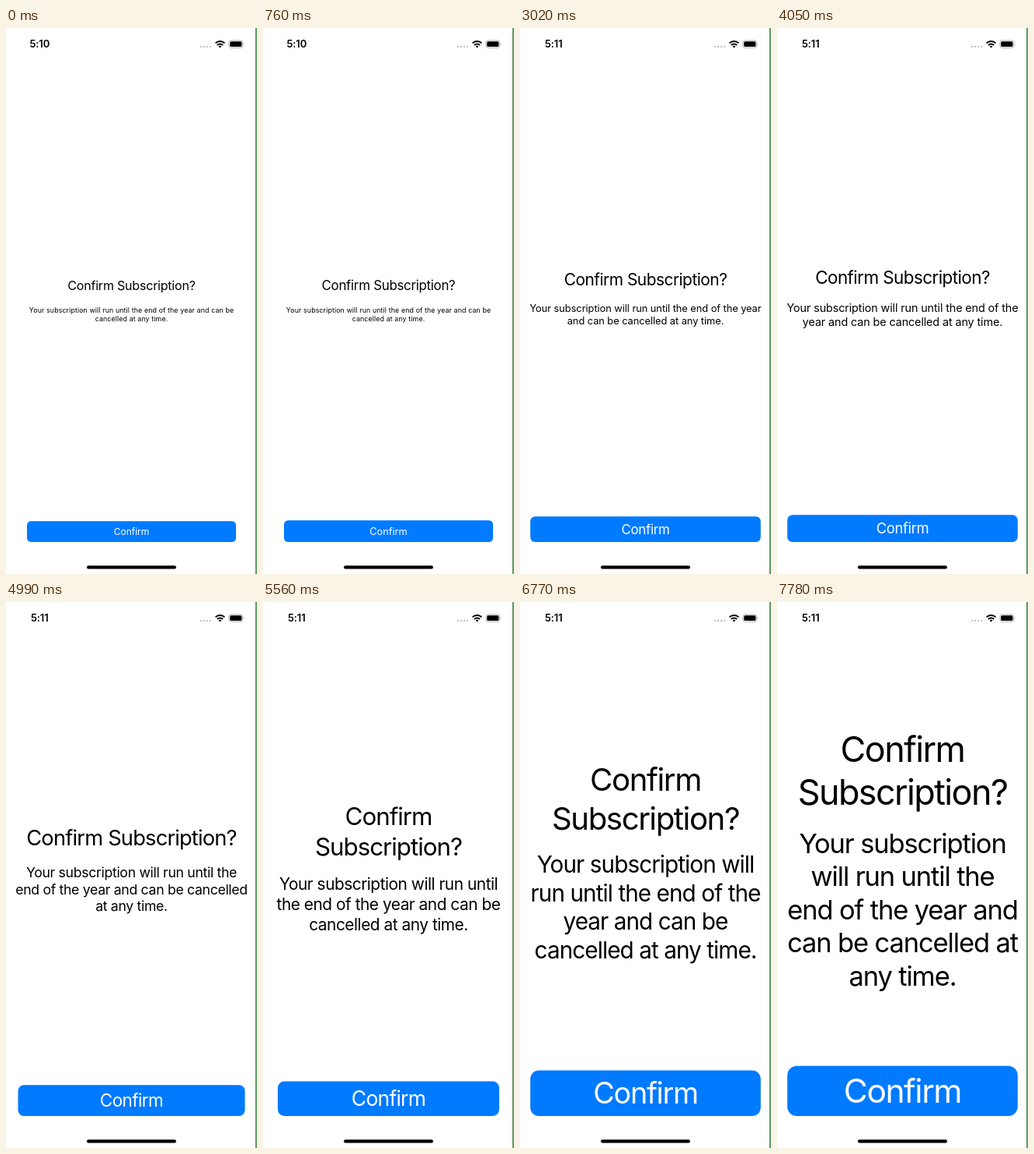
Write an HTML page that moves like this. It is 323 px wide and 700 px high and loops after 8.79 s.

```html
<!DOCTYPE html>
<html lang="en">
<head>
<meta charset="utf-8">
<style>
  html, body { margin: 0; width: 100%; height: 100%; overflow: hidden; background: #fff; }
  svg { display: block; width: 323px; height: 700px; }
  text { font-family: Inter, Roboto, sans-serif; font-optical-sizing: none; text-anchor: middle; }
</style>
</head>
<body>
<svg viewBox="0 0 323 700">
  <text id="clock" x="43.3" y="25.4" font-size="13" font-weight="600" letter-spacing="-.1"></text>
  <g fill="#c4c4c6">
    <circle cx="251" cy="24" r="1.2"/><circle cx="255" cy="24" r="1.2"/>
    <circle cx="259" cy="24" r="1.2"/><circle cx="263" cy="24" r="1.2"/>
  </g>
  <g fill="none" stroke="#000" stroke-width="2">
    <path d="M269.6 19.4a8.2 8.2 0 0 1 11.8 0M271.9 22a5 5 0 0 1 7.2 0"/>
    <path d="M275.5 25.6l-1.9-2a2.7 2.7 0 0 1 3.8 0z" fill="#000" stroke="none"/>
  </g>
  <rect x="286.9" y="16" width="17.8" height="9.4" rx="2.8" fill="none" stroke="#a8a8a8" stroke-width=".9"/>
  <rect x="288.2" y="17.3" width="15.2" height="6.8" rx="1.6"/>
  <path d="M305.7 19.2q1.5 1.5 0 3z" fill="#a8a8a8"/>
  <g id="content"></g>
  <rect x="104" y="689.3" width="115" height="4.2" rx="2.1"/>
  <rect x="321.2" width="1.3" height="700" fill="#0a640f"/>
</svg>
<script>
const LOOP = 8790, CLOCK_TICK = 1420;
const SCALE = 0.828, CENTER = 161.5, GAP = 16.3, BUTTON_BOTTOM = 659, TOP = 67;
const words = 'Your subscription will run until the end of the year and can be cancelled at any time.'.split(' ');

// start time, title / note / button point sizes, button width, words before each line break
const steps = [
  [0, 20, 11, 15, 269, [13]],
  [760, 21, 11, 16, 269, [13]],
  [1750, 22, 12, 17, 289.5, [13]],
  [2380, 24, 14, 19, 290, [11]],
  [3020, 26, 16, 21, 296.5, [10]],
  [4050, 28, 18, 23, 296.5, [9]],
  [4990, 34, 22, 28, 292, [6, 14]],
  [5560, 39, 26, 33, 285, [5, 13]],
  [6290, 44, 32, 40, 288, [4, 10, 15]],
  [6770, 50, 37, 47, 296.5, [3, 9, 13]],
  [7780, 56, 43, 53, 296.5, [2, 6, 11, 15]]
];

const lineHeight = pt => pt * SCALE * 1.193;

// Tracking tightens as the type grows
function line(str, pt, middle, fill = '#000') {
  const px = pt * SCALE, tracking = 0.13 * Math.exp(-pt / 11) - 0.035;
  return `<text x="${CENTER}" y="${middle + px * 0.352}" font-size="${px * 0.97}" ` +
    `letter-spacing="${tracking * px}" fill="${fill}">${str}</text>`;
}

function block(lines, pt, top) {
  return lines.map((str, i) => line(str, pt, top + (i + 0.5) * lineHeight(pt))).join('');
}

function screen([, titlePt, notePt, buttonPt, width, breaks]) {
  const title = titlePt > 34 ? ['Confirm', 'Subscription?'] : ['Confirm Subscription?'];
  const note = [...breaks, words.length].map((end, i) => words.slice(breaks[i - 1] || 0, end).join(' '));
  const height = lineHeight(buttonPt) + 12, buttonTop = BUTTON_BOTTOM - height;
  const titleHeight = title.length * lineHeight(titlePt);
  const total = titleHeight + GAP + note.length * lineHeight(notePt);
  const top = (TOP + buttonTop - total) / 2;
  return block(title, titlePt, top) +
    block(note, notePt, top + titleHeight + GAP) +
    `<rect x="${CENTER - width / 2}" y="${buttonTop}" width="${width}" height="${height}" rx="${height * 0.19}" fill="#007aff"/>` +
    line('Confirm', buttonPt, buttonTop + height / 2, '#fff');
}

const clock = document.getElementById('clock'), content = document.getElementById('content');
const screens = steps.map(screen);
let shown = -1;

function draw(now) {
  const t = now % LOOP;
  const index = steps.filter(([start]) => start <= t).length - 1;
  clock.textContent = t < CLOCK_TICK ? '5:10' : '5:11';
  if (index !== shown) content.innerHTML = screens[shown = index];
  requestAnimationFrame(() => draw(performance.now()));
}
draw(performance.now());
</script>
</body>
</html>
```
